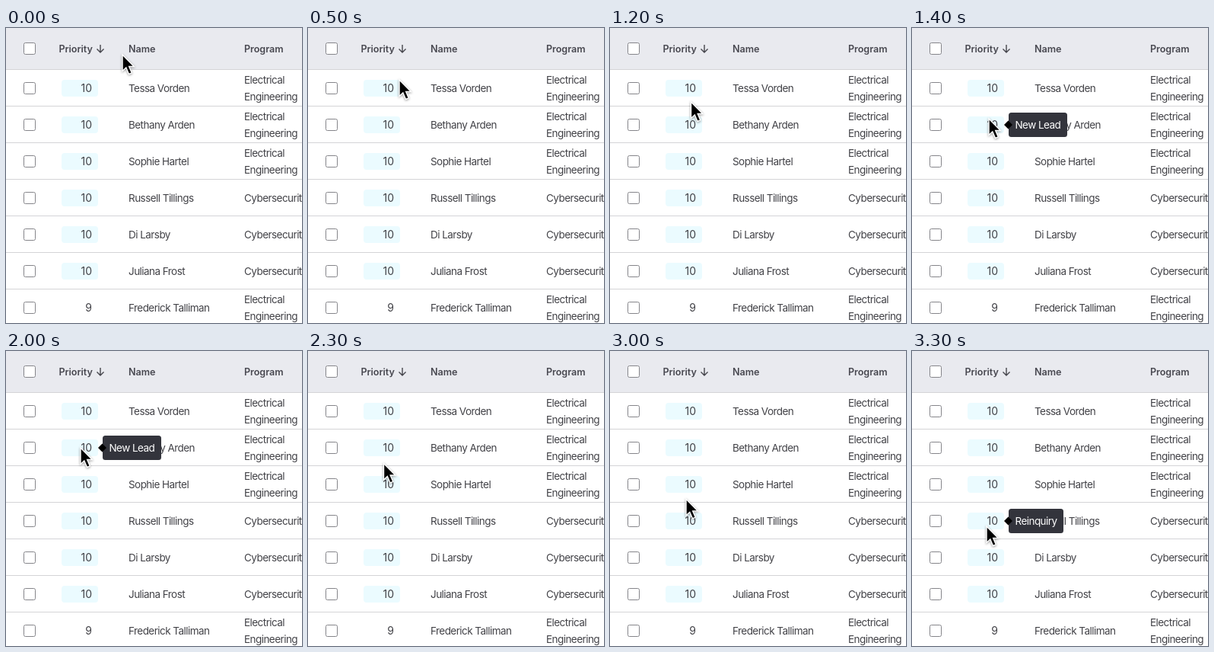
Write an HTML page that moves like this. It is 389 px wide and 387 px high and loops after 3.4 s.

```html
<!DOCTYPE html>
<html lang="en">
<head>
<meta charset="utf-8">
<title>Lead list</title>
<style>
  html, body { margin: 0; width: 100%; height: 100%; overflow: hidden; background: #fff; }
  svg { display: block; }
  text { font: 400 13.5px Inter, sans-serif; letter-spacing: -.55px; fill: #424247; }
  .head { font-size: 12.6px; font-weight: 600; letter-spacing: -.05px; fill: #484850; }
  .num { font-size: 14px; letter-spacing: 0; text-anchor: end; }
  .box { fill: #fff; stroke: #85858a; }
  .line { fill: #d4d4d7; }
  #tip text { fill: #fff; }
  #cursor { filter: drop-shadow(0 1.5px 1.5px #0006); }
</style>
</head>
<body>
<svg id="stage" width="389" height="387" viewBox="0 0 389 387"></svg>
<script>
const LOOP = 3400, STEP = 100;
const ROW = 48, FIRST = 79;
const ELECTRICAL = ['Electrical', 'Engineering'], CYBER = ['Cybersecurity'];
const rows = [
  [10, 'Tessa Vorden', ELECTRICAL],
  [10, 'Bethany Arden', ELECTRICAL],
  [10, 'Sophie Hartel', ELECTRICAL],
  [10, 'Russell Tillings', CYBER],
  [10, 'Di Larsby', CYBER],
  [10, 'Juliana Frost', CYBER],
  [9, 'Frederick Talliman', ELECTRICAL]
];
const hints = ['New Lead', 'New Lead', 'New Program', 'Reinquiry'];

// time, x, y of the pointer tip
const path = [
  [0, 153, 35], [500, 120, 68], [700, 112, 74], [1000, 112, 75],
  [1400, 101, 119], [1600, 98, 127], [2100, 98, 127],
  [2500, 101, 168], [2700, 101, 175], [2900, 101, 178],
  [3200, 98, 227], [3300, 98, 230], [3400, 98, 230]
];

const text = (x, y, s, cls = '') => `<text x="${x}" y="${y}" class="${cls}">${s}</text>`;
const checkbox = y => `<rect class="box" x="23.5" y="${y - 7.5}" width="15" height="15" rx="2"/>`;
const line = y => `<rect class="line" y="${y}" width="389" height="1"/>`;

function rowMarkup([score, name, program], i) {
  const y = FIRST + i * ROW;
  const badge = score === 10
    ? `<rect x="73" y="${y - 11}" width="48" height="22" rx="4" fill="#ebfbff"/>` : '';
  const top = y + 5 - 11 * (program.length - 1);
  return line(y + 23) + checkbox(y) + badge + text(113, y + 5, score, 'num') +
    text(161, y + 5, name) + program.map((s, k) => text(313, top + 22 * k, s)).join('');
}

const stage = document.getElementById('stage');
stage.innerHTML = `
  <rect width="389" height="54" fill="#e9eaef"/>
  ${line(54)}${checkbox(27)}
  ${text(69.5, 31.5, 'Priority', 'head')}${text(161, 31.5, 'Name', 'head')}${text(313, 31.5, 'Program', 'head')}
  <path d="M124 22V32M119.5 27.5L124 32L128.5 27.5" fill="none" stroke="#45454c" stroke-width="1.4"/>
  ${rows.map(rowMarkup).join('')}
  <g id="tip">
    <rect x="127" y="-16" height="32" rx="3.5" fill="#33343c"/>
    <path d="M121 0L126.5 -5.5L132 0L126.5 5.5Z"/>
    <text x="135.5" y="5"></text>
  </g>
  <path id="cursor" d="M0 0V21.5L4.8 17L8.5 25.5L12.3 23.9L8.7 15.5H15.3Z" stroke="#fff" stroke-width="1.4"/>`;

const tip = document.getElementById('tip'), cursor = document.getElementById('cursor');
const panel = tip.querySelector('rect'), label = tip.querySelector('text');

function pointer(t) {
  const i = path.findIndex(p => p[0] > t);
  const [t0, x0, y0] = path[i - 1], [t1, x1, y1] = path[i];
  const k = (t - t0) / (t1 - t0);
  return [x0 + (x1 - x0) * k, y0 + (y1 - y0) * k];
}

function draw(now) {
  const t = Math.floor(now % LOOP / STEP) * STEP;
  const [x, y] = pointer(t);
  cursor.setAttribute('transform', `translate(${x} ${y})`);

  const row = Math.round((y - FIRST) / ROW), center = FIRST + row * ROW;
  const hover = row >= 0 && x < 121 && Math.abs(y - center) < 11;
  tip.setAttribute('visibility', hover ? 'visible' : 'hidden');
  if (hover) {
    label.textContent = hints[row];
    panel.setAttribute('width', Math.round(label.getComputedTextLength() + 17));
    tip.setAttribute('transform', `translate(0 ${center})`);
  }
}

const start = performance.now();
function frame() {
  draw(performance.now() - start);
  requestAnimationFrame(frame);
}
frame();
</script>
</body>
</html>
```
